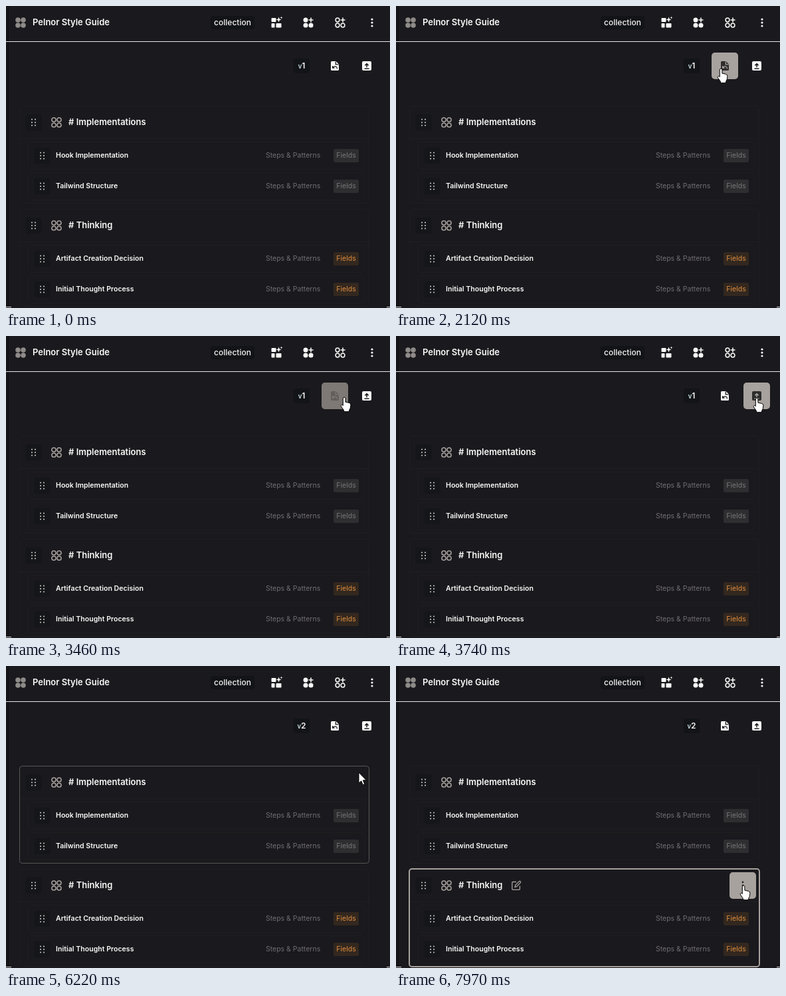
Write an HTML page that moves like this. It is 578x454 px and loops after 8 s.

```html
<!DOCTYPE html>
<html lang="en">
<head>
<meta charset="utf-8">
<title>Style guide collection</title>
<style>
  html, body { margin: 0; width: 100%; height: 100%; overflow: hidden; background: #1a191d; }
  svg { display: block; width: 578px; height: 454px; font-family: Inter, sans-serif; }
  .head { font-size: 13px; font-weight: 600; fill: #fafaf9; }
  .name { font-size: 10.6px; font-weight: 600; fill: #fafaf9; }
  .meta { font-size: 10.5px; fill: #706e72; }
  .chip { fill: #121417; }
  .grip { fill: #151619; }
  .faint { fill: none; stroke: #1f1f22; }
  .tip rect { fill: #1a1a1c; stroke: #a8a29e; }
  .tip text { font: 13px "Open Sans", sans-serif; fill: #f0eeec; }
  #pointer { fill: #fff; stroke: #000; stroke-width: 1; stroke-linejoin: round; }
</style>
</head>
<body>
<svg id="stage" viewBox="0 0 578 454">
  <rect width="578" height="454" fill="#1a191d"/>
  <rect width="3" height="454" fill="#151518"/>
  <rect x="3" width="1" height="454" fill="#0f0f11"/>
  <rect y="53" width="578" height="1" fill="#e7e5e4"/>
  <path d="M0 452.5H8M573 452.5H578" stroke="#d6d3d1"/>

  <g id="badge" fill="#8e8b88"></g>
  <text class="head" x="40" y="29">Pelnor Style Guide</text>
  <rect class="chip" x="308" y="15" width="66" height="20" rx="4"/>
  <text x="341" y="29" text-anchor="middle" font-size="12" font-weight="500" fill="#f5f5f4">collection</text>

  <g fill="#fafaf9">
    <rect x="399.5" y="18" width="7" height="6" rx="1"/>
    <rect x="399.5" y="26" width="5" height="6.5" rx="1"/>
    <rect x="406.5" y="26" width="8" height="6.5" rx="1"/>
    <path d="M410.5 16.5l1.1 2.9 2.9 1.1-2.9 1.1-1.1 2.9-1.1-2.9-2.9-1.1 2.9-1.1zM414.5 15.5l.5 1.5 1.5.5-1.5.5-.5 1.5-.5-1.5-1.5-.5 1.5-.5z"/>
    <g id="addFilled"></g>
    <g id="addOutline"></g>
    <circle cx="551" cy="20" r="1.6"/><circle cx="551" cy="25" r="1.6"/><circle cx="551" cy="30" r="1.6"/>
  </g>

  <rect class="chip" x="433" y="79" width="24" height="22" rx="4"/>
  <text x="445" y="94.3" text-anchor="middle" font-size="12" font-weight="600" fill="#f5f5f4"><tspan font-size="9.5" fill="#cfe3ea">v</tspan><tspan id="version">1</tspan></text>

  <g id="groups"></g>

  <g id="revert">
    <rect class="pad" x="475" y="70" width="40" height="40" rx="5"/>
    <path class="icon" d="M490.5 83H496.5L501 87.5V95.5Q501 97 499.5 97H490.5Q489 97 489 95.5V84.5Q489 83 490.5 83z"/>
    <path class="mark" fill="none" stroke-width="1.3" d="M496.3 83.5V87.8H500.6M491.6 90V93H494.4M491.9 92.6Q494.5 89.5 498.3 92.2M498.3 92.4V94.6"/>
  </g>
  <g id="publish">
    <rect class="pad" x="523" y="70" width="40" height="40" rx="5"/>
    <rect class="icon" x="536" y="83" width="14" height="14" rx="2"/>
    <path class="mark" fill="none" stroke-width="1.5" d="M543 92.2V86.8M540.4 89.4L543 86.8 545.6 89.4M539.5 94.2H546.5"/>
  </g>

  <g id="tools">
    <path fill="none" stroke="#a8a29e" stroke-width="1.3" d="M181 324.5H176.2Q174.8 324.5 174.8 326V335Q174.8 336.4 176.2 336.4H185Q186.4 336.4 186.4 335V330.5M179 332.4L179.6 329.6 185.6 323.6Q186.8 323 187.5 324.4 187.8 325 187.4 325.6L181.6 331.6z"/>
    <rect x="502" y="310" width="40" height="40" rx="5" fill="#a8a29e"/>
    <g fill="#2c2a2a"><circle cx="522" cy="325" r="1.4"/><circle cx="522" cy="330" r="1.4"/><circle cx="522" cy="335" r="1.4"/></g>
  </g>

  <g id="revertTip" class="tip">
    <rect x="408.5" y="114.5" width="173" height="33" rx="5"/>
    <text x="421" y="136">Revert Version (Ctrl + R)</text>
  </g>
  <g id="publishTip" class="tip">
    <rect x="474.5" y="114.5" width="137" height="33" rx="5"/>
    <text x="487" y="136">Publish (Ctrl + P)</text>
  </g>

  <g id="pointer">
    <path id="arrow" d="M0 0V16.2L3.7 12.8 6.2 18.6 8.8 17.5 6.3 11.8H11.3z"/>
    <path id="hand" d="M-1.7 11.5V.9a1.8 1.8 0 0 1 3.6 0V6.2L7.4 7.4Q10.2 8 9.9 11L9.2 15.4 7.5 18.8V20.7H-.4V18.8L-4.3 13.2Q-5.5 11 -3.9 10.5 -2.7 10.3 -1.7 11.5z"/>
  </g>
</svg>

<script>
const LOOP = 8000, STEP = 70;
const $ = id => document.getElementById(id);

// ---- static parts ----
const dot = (x, y, r, extra = '') => `<circle cx="${x}" cy="${y}" r="${r}" ${extra}/>`;
const quad = (cx, cy, r, extra) =>
  [[-4, -4], [4, -4], [-4, 4], [4, 4]].map(([x, y]) => dot(cx + x, cy + y, r, extra));
const outline = 'fill="none" stroke-width="1.5" stroke="';
const plus = cx => `<path d="M${cx + 4} 17.5V24.5M${cx + .5} 21H${cx + 7.5}" stroke="#fafaf9" stroke-width="1.6"/>`;
const without = (list, i) => list.filter((_, n) => n !== i).join('');

$('badge').innerHTML = quad(22, 25, 3.8).join('');
$('addFilled').innerHTML = without(quad(455, 25, 3.5), 1) + plus(455);
$('addOutline').innerHTML = without(quad(503, 25, 2.9, outline + '#fafaf9"'), 1) + plus(503);

function grip(cx, cy) {
  let out = `<rect class="grip" x="${cx - 12}" y="${cy - 12}" width="24" height="24" rx="4"/><g fill="#d6d3d1">`;
  for (const x of [-2.5, 2.5]) for (const y of [-4.5, 0, 4.5]) out += dot(cx + x, cy + y, 1);
  return out + '</g>';
}

function row(name, y, id, [chip, label]) {
  return `<rect id="${id}" class="faint" x="33.5" y="${y - 20}" width="506" height="41" rx="4"/>
    ${grip(54.5, y + .5)}
    <text class="name" x="75" y="${y + 3.8}">${name}</text>
    <text class="meta" x="391" y="${y + 3.8}">Steps &amp; Patterns</text>
    <rect x="493" y="${y - 9.5}" width="38" height="20" rx="2" fill="${chip}"/>
    <text class="meta" x="512" y="${y + 3.8}" text-anchor="middle" style="fill:${label}">Fields</text>`;
}

function group(id, title, y, names, colors) {
  return `<path class="faint" d="M21 ${y + 49}H546"/>
    ${names.map((name, i) => row(name, y + 74 + 46 * i, id + i, colors)).join('')}
    <rect id="${id}" class="faint" x="20.5" y="${y}" width="526" height="146" rx="4"/>
    ${grip(41.5, y + 24.5)}
    ${quad(76, y + 24.5, 3.1, outline + '#a8a29e"').join('')}
    <text class="head" x="94" y="${y + 28.7}">${title}</text>`;
}

$('groups').innerHTML =
  group('impl', '# Implementations', 150.5, ['Hook Implementation', 'Tailwind Structure'], ['#2e2e31', '#77757a']) +
  group('think', '# Thinking', 305.5, ['Artifact Creation Decision', 'Initial Thought Process'], ['#33281f', '#df8d3f']);

// ---- motion ----
const bursts = [[0, 0], [1280, 1420], [1700, 2470], [2540, 2820], [3320, 3740], [4590, 4590], [5090, 5090],
  [5230, 5230], [5940, 6710], [6780, 7130], [7340, 7340], [7480, 7480], [7620, 7830], [7970, 7970]];

const path = [[1280, 559, 432], [1350, 570, 399], [1700, 573, 181], [1770, 542, 140], [1840, 514, 107],
  [1980, 496, 98], [2200, 485, 93], [2470, 475, 90], [2820, 509, 93], [3460, 509, 93], [3740, 543, 94],
  [5940, 543, 96], [6220, 531, 160], [6430, 508, 235], [6570, 486, 290], [6710, 467, 318],
  [7130, 521, 332], [7620, 521, 333], [7830, 521, 333], [7970, 523, 331]];

// The picture advances in small steps inside each burst and holds between them.
function snap(t) {
  const [from, to] = bursts.filter(b => b[0] <= t).pop();
  return Math.min(to, from + Math.floor((t - from) / STEP) * STEP);
}

function track(t, keys) {
  if (t <= keys[0][0]) return keys[0].slice(1);
  const i = keys.findIndex(k => k[0] > t);
  if (i < 0) return keys[keys.length - 1].slice(1);
  const a = keys[i - 1], b = keys[i], u = (t - a[0]) / (b[0] - a[0]);
  return a.slice(1).map((v, n) => v + (b[n + 1] - v) * u);
}

const level = (t, ...keys) => track(t, keys)[0];
const within = (t, from, to) => t >= from && t < to;
const show = (id, on) => { $(id).style.display = on ? '' : 'none'; };

const BG = [26, 25, 29], STONE = [168, 162, 158], DIM = [126, 121, 117], WHITE = [250, 250, 249],
  INK = [46, 44, 44], DIM_INK = [99, 95, 92], LINE = [31, 31, 34], HOVER = [142, 140, 137];
const mix = (a, b, u) => a.map((v, i) => Math.round(v + (b[i] - v) * u));
const rgb = c => `rgb(${c})`;

function paintButton(id, hover, busyPad, busyIcon) {
  const pad = rgb(mix(BG, mix(STONE, DIM, busyPad), hover));
  const icon = rgb(mix(WHITE, mix(INK, DIM_INK, busyIcon), hover));
  const part = name => $(id).querySelector('.' + name).style;
  part('pad').fill = pad;
  part('icon').fill = icon;
  part('mark').stroke = pad;
}

function paint(time) {
  const t = snap(time);

  const revertHover = level(t, [1770, 0], [1980, 1], [3530, 1], [3740, 0]);
  const busy = level(t, [3250, 0], [3390, 1]);
  paintButton('revert', revertHover, busy, busy);
  paintButton('publish', level(t, [3530, 0], [3740, 1], [5940, 1], [6150, 0]), 0, within(t, 5090, 5230) ? 1 : 0);
  show('revertTip', within(t, 2470, 2820));
  show('publishTip', within(t, 4590, 5090));
  $('version').textContent = t >= 5230 ? '2' : '1';

  const implHover = level(t, [6150, 0], [6290, 1], [6570, 1], [6710, .23], [6850, 0]);
  $('impl').style.stroke = rgb(mix(LINE, HOVER, implHover));
  $('impl0').style.stroke = rgb(mix(LINE, HOVER, level(t, [6290, 0], [6360, .2], [6430, .2], [6570, 0])));
  $('impl1').style.stroke = rgb(mix(LINE, HOVER, level(t, [6430, 0], [6500, .2], [6570, .2], [6710, .07], [6850, 0])));

  const selected = level(t, [7550, 0], [7760, 1]);
  const frame = $('think');
  const lit = mix(LINE, HOVER, level(t, [6570, 0], [6710, 1]));
  frame.style.stroke = rgb(mix(lit, STONE, selected));
  frame.style.strokeWidth = 1 + selected;
  const grow = selected / 2;
  frame.setAttribute('x', 20.5 - grow);
  frame.setAttribute('y', 305.5 - grow);
  frame.setAttribute('width', 526 + 2 * grow);
  frame.setAttribute('height', 146 + 2 * grow);
  $('tools').style.opacity = selected;

  const [x, y] = track(t, path);
  const pointing = within(t, 1840, 6010) || t >= 7620;
  show('pointer', within(t, 1280, 1420) || within(t, 1700, 7340) || t >= 7620);
  show('hand', pointing);
  show('arrow', !pointing);
  $('pointer').setAttribute('transform', `translate(${Math.round(x)} ${Math.round(y)})`);
}

const start = performance.now();
function tick() {
  paint((performance.now() - start) % LOOP);
  requestAnimationFrame(tick);
}
tick();
</script>
</body>
</html>
```
